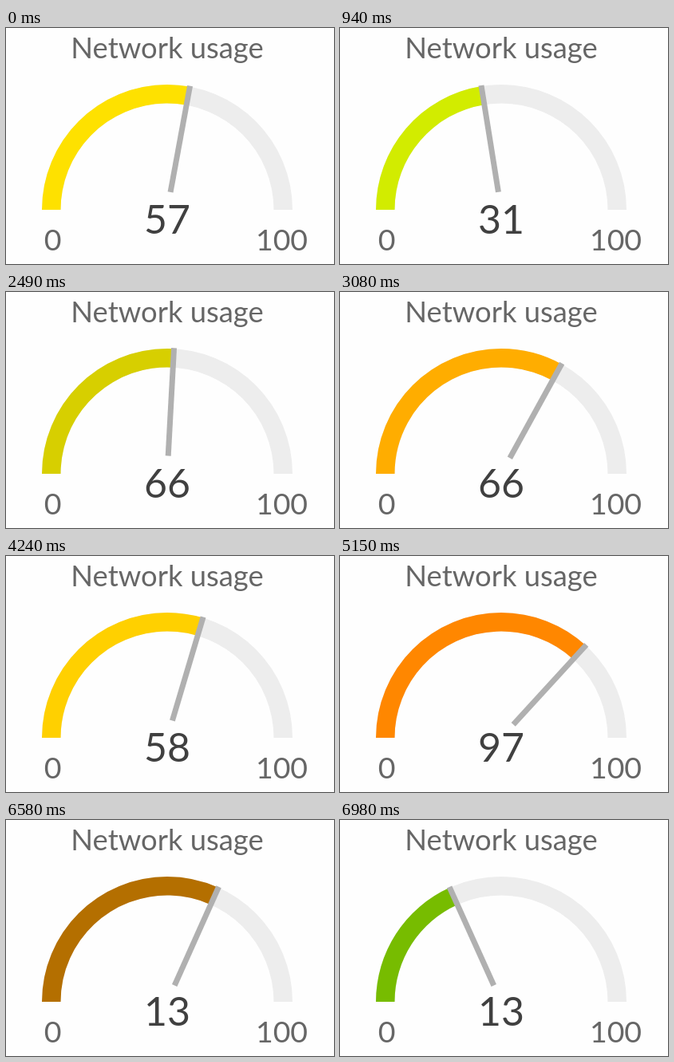
Write an HTML page with a canvas that moves like this. It is 411 by 296 pixels and loops after 7.08 s.

```html
<!DOCTYPE html>
<html lang="en">
<head>
<meta charset="utf-8">
<title>Network usage</title>
<style>
  html, body { margin: 0; width: 100%; height: 100%; overflow: hidden; background: #fefefe; }
  canvas { display: block; }
</style>
</head>
<body>
<canvas id="gauge" width="411" height="296"></canvas>
<script>
const ctx = document.getElementById('gauge').getContext('2d');
const CX = 202, CY = 228, OUTER = 157, INNER = 133.5;

// A new reading arrives every PERIOD; the needle sweeps to it in coarse steps
const LOOP = 7080, PERIOD = 1434, SWEEP = 1250, STEP = 80, LEAD = 1104;
const readings = [49, 57, 31, 66, 58, 97, 13];

const mix = (a, b, k) => a + (b - a) * k;
const angleOf = value => Math.PI * (1 + value / 100);

// Green through yellow to red
function levelColor(value) {
  const k = value / 50;
  return [255 * Math.min(1, k), 255 * Math.min(1, 2 - k), 0];
}

function band(from, to, color) {
  ctx.beginPath();
  ctx.arc(CX, CY, OUTER, from, to);
  ctx.arc(CX, CY, INNER, to, from, true);
  ctx.fillStyle = color;
  ctx.fill();
}

function needle(angle) {
  const c = Math.cos(angle), s = Math.sin(angle);
  ctx.beginPath();
  ctx.moveTo(CX + 22.5 * c, CY + 22.5 * s);
  ctx.lineTo(CX + 158 * c, CY + 158 * s);
  ctx.lineWidth = 7;
  ctx.strokeStyle = '#b0b0b0';
  ctx.stroke();
}

function label(text, x, y, size, color) {
  ctx.font = `${size}px Lato, "Open Sans", sans-serif`;
  ctx.textAlign = 'center';
  ctx.fillStyle = color;
  ctx.fillText(text, x, y);
}

function draw(time) {
  const elapsed = time + LEAD;
  const index = Math.floor(elapsed / PERIOD);
  const from = readings[index], to = readings[index + 1];
  const stepped = (Math.floor(elapsed % PERIOD / STEP) + 0.25) * STEP;
  const k = Math.min(1, stepped / SWEEP);
  const angle = angleOf(mix(from, to, k));
  const endColor = levelColor(to);
  const rgb = levelColor(from).map((v, i) => Math.round(mix(v, endColor[i], k)));

  ctx.fillStyle = '#fefefe';
  ctx.fillRect(0, 0, 411, 296);
  band(Math.PI, 2 * Math.PI, '#ededed');
  band(Math.PI, angle, `rgb(${rgb})`);
  needle(angle);
  label('Network usage', 202, 38, 36.4, '#666');
  label(to, 202, 257.5, 50, '#404040');
  label('0', 58.5, 279, 37.5, '#666');
  label('100', 345.5, 279, 37.5, '#666');
}

const began = performance.now();
function frame() {
  draw((performance.now() - began) % LOOP);
  requestAnimationFrame(frame);
}
frame();
</script>
</body>
</html>
```
